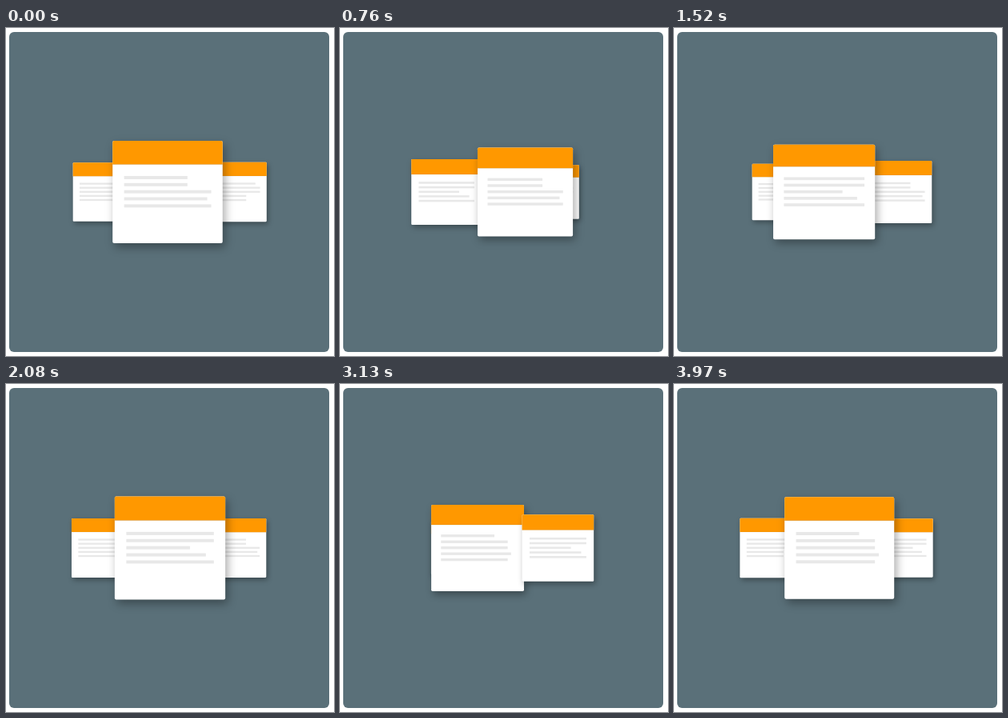
An HTML page with a canvas that plays this animation: 410 by 410 pixels, repeating every 4.04 s.

```html
<!DOCTYPE html>
<html lang="en">
<head>
<meta charset="utf-8">
<title>Card carousel</title>
<style>
  html, body { margin: 0; width: 100%; height: 100%; overflow: hidden; background: #fff; }
  canvas { display: block; width: 410px; height: 410px; }
</style>
</head>
<body>
<canvas id="stage"></canvas>
<script>
const SIZE = 410;
const LOOP = 4040;      // ms
const STEP = 1820;      // ms for one quarter turn
const FIRST = 153;      // ms, first card rests at the front
const TICK = 70;        // ms between picture changes
const TICK_STARTS = [1520, 550, 0];

const CENTER = { x: 204, y: 205 };
const CARD = { w: 139, h: 129.5, head: 30, radius: 2 };
const TEXT = { x: 14.6, y: 46.5, pitch: 8.95, thick: 4 };
const SPREAD = 144.4;   // sideways distance at full scale
const FALLOFF = 0.75;   // perspective per depth unit

// Text line lengths, in the order the cards reach the front
const CARDS = [
  [80, 80, 110, 105, 110],
  [110, 110, 80, 100, 110],
  [80, 100, 100, 105, 100],
  [100, 110, 110, 80, 80]
];

const canvas = document.getElementById('stage');
const ctx = canvas.getContext('2d');
const dpr = window.devicePixelRatio || 1;
canvas.width = canvas.height = Math.round(SIZE * dpr);

const mod4 = v => ((v % 4) + 4) % 4;
const depthAt = v => 2 - Math.abs(2 - mod4(v));
const ease = p => p < 0.5 ? 2 * p * p : 1 - 2 * (1 - p) * (1 - p);

// The cards travel straight along a diamond: front, right, back, left
function sideAt(v) {
  const m = mod4(v);
  return m < 1 ? m : m < 3 ? 2 - m : m - 4;
}

function snap(t) {
  const start = TICK_STARTS.find(s => t >= s);
  return start + Math.floor((t - start) / TICK) * TICK;
}

function fillRound(x, y, w, h, r, color) {
  ctx.fillStyle = color;
  ctx.beginPath();
  ctx.roundRect(x, y, w, h, r);
  ctx.fill();
}

function drawCard({ lines, depth, side }) {
  const s = 1 / (1 + FALLOFF * depth);
  const { w, h, head, radius } = CARD;

  ctx.save();
  ctx.translate(CENTER.x + side * SPREAD * s, CENTER.y);
  ctx.scale(s, s);
  ctx.translate(-w / 2, -h / 2);

  // Canvas shadows ignore the transform, so scale them here
  ctx.shadowColor = 'rgba(0, 0, 0, 0.34)';
  ctx.shadowBlur = 12 * s * dpr;
  ctx.shadowOffsetX = 3 * s * dpr;
  ctx.shadowOffsetY = 5 * s * dpr;
  fillRound(0, 0, w, h, radius, '#fff');
  ctx.shadowColor = 'transparent';

  fillRound(0, 0, w, head, [radius, radius, 0, 0], '#ff9800');
  ctx.fillStyle = 'rgba(0, 0, 0, 0.12)';
  ctx.fillRect(0, head - 0.4, w, 0.8);

  ctx.fillStyle = '#e8e8e8';
  lines.forEach((len, i) => {
    ctx.fillRect(TEXT.x, TEXT.y + i * TEXT.pitch - TEXT.thick / 2, len, TEXT.thick);
  });
  ctx.restore();
}

function draw(t) {
  const q = (t - FIRST) / STEP;
  const step = Math.floor(q);
  const turn = step + ease(q - step);

  ctx.setTransform(dpr, 0, 0, dpr, 0, 0);
  ctx.fillStyle = '#fff';
  ctx.fillRect(0, 0, SIZE, SIZE);
  fillRound(4, 5, 400, 400, 6, '#5a7079');

  // Stacking changes only late in each step
  CARDS
    .map((lines, i) => {
      const v = turn - i;
      return { lines, depth: depthAt(v), side: sideAt(v), layer: depthAt(Math.floor(v + 0.25)) };
    })
    .sort((a, b) => b.layer - a.layer || b.depth - a.depth)
    .forEach(drawCard);
}

const begin = performance.now();

function frame() {
  // Small lead so a change is on screen when it is due
  draw(snap((performance.now() - begin + 6) % LOOP));
  requestAnimationFrame(frame);
}
frame();
</script>
</body>
</html>
```
